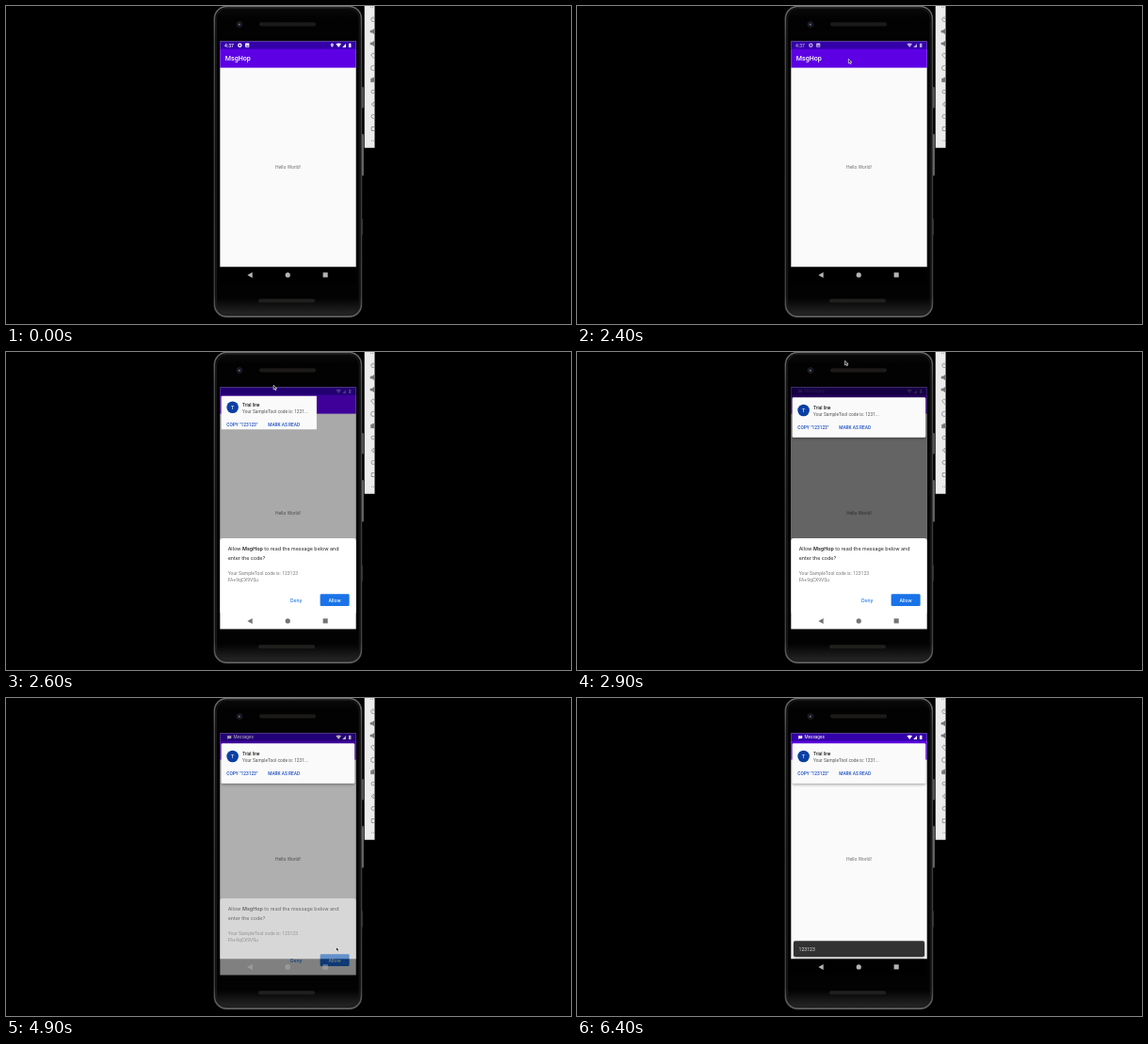
Recreate the animation shown at these times as an HTML page. Size 600 px wide and 338 px high, loop 7300 ms.

```html
<!DOCTYPE html>
<html lang="en">
<head>
<meta charset="utf-8">
<title>Message code prompt</title>
<style>
html, body { margin: 0; width: 100%; height: 100%; overflow: hidden; background: #000; }
svg { display: block; width: 100vw; height: 100vh; }
text { font-family: Roboto, "Noto Sans", sans-serif; font-size: 4.8px; white-space: pre; }
.medium { font-weight: 500; }
.prompt { font-family: Inter, Roboto, sans-serif; font-size: 5.2px; fill: #202124; }
</style>
</head>
<body>
<svg viewBox="0 0 600 338" xmlns="http://www.w3.org/2000/svg">
  <defs>
    <linearGradient id="rim" x1="0" x2="0" y1="0" y2="1">
      <stop offset="0" stop-color="#6a6a6a"/><stop offset=".1" stop-color="#4a4a4a"/>
      <stop offset=".5" stop-color="#3a3a3a"/><stop offset=".93" stop-color="#404040"/>
      <stop offset="1" stop-color="#686868"/>
    </linearGradient>
    <linearGradient id="body" x1="0" x2="0" y1="0" y2="1">
      <stop offset="0" stop-color="#0a0a0a"/><stop offset=".04" stop-color="#020202"/>
      <stop offset=".94" stop-color="#020202"/><stop offset="1" stop-color="#2a2a2a"/>
    </linearGradient>
    <filter id="shadow" x="-10%" y="-20%" width="120%" height="150%">
      <feDropShadow dx="0" dy="1.2" stdDeviation="1.4" flood-color="#000" flood-opacity=".38"/>
    </filter>
    <clipPath id="screen"><rect x="227.3" y="37.6" width="144.4" height="257"/></clipPath>
    <clipPath id="strip"><rect x="380.7" width="10.8" height="150.7"/></clipPath>
    <clipPath id="reveal"><rect id="revealBox"/></clipPath>
    <g id="navIcons">
      <path d="M261.7 283v6l-5.4-3z"/>
      <circle cx="299.2" cy="285.9" r="2.6"/>
      <rect x="336.6" y="283.3" width="5.1" height="5.1"/>
    </g>
  </defs>

  <rect width="600" height="338"/>

  <!-- Phone body -->
  <rect x="377.8" y="86" width="2" height="22.5" rx="1" fill="#5c5c5c"/>
  <rect x="377.8" y="136" width="2" height="44.5" rx="1" fill="#727272"/>
  <rect x="377.6" y="226.5" width="1.3" height="17" fill="#303030"/>
  <rect x="221.4" y=".5" width="156" height="329.8" rx="13" fill="url(#body)" stroke="url(#rim)" stroke-width="1.6"/>
  <rect x="223.6" y="2.6" width="151.6" height="325.4" rx="11" fill="none" stroke="#1c1c1c" stroke-width=".9"/>
  <rect x="269" y="17.2" width="60" height="4.2" rx="2" fill="#1c1a19"/>
  <rect x="268" y="311.2" width="60" height="4" rx="2" fill="#201f1e"/>
  <circle cx="247.9" cy="19.5" r="2.8" fill="#0b0d14" stroke="#2c2c2c" stroke-width=".8"/>
  <circle cx="247.8" cy="19.6" r="1.2" fill="#53668f"/>

  <!-- Emulator strip -->
  <g clip-path="url(#strip)">
    <rect x="380" width="12" height="151" fill="#ececec"/>
    <g id="tools" fill="none" stroke="#777" stroke-width=".7"/>
  </g>

  <g clip-path="url(#screen)">
    <rect x="227" y="37" width="145" height="240.5" fill="#fafafa"/>
    <rect x="227" y="45" width="145" height="20.6" fill="#5d00e4"/>
    <rect x="227" y="37" width="145" height="8.7" fill="#3400a9"/>
    <text class="medium" x="232.8" y="58.3" fill="#fff" style="font-size:7.1px">MsgHop</text>
    <text x="299.4" y="173.4" fill="#757575" text-anchor="middle" style="font-size:5px">Hello World!</text>
    <g fill="#fff">
      <g id="clock">
        <text class="medium" x="232" y="43.6" style="font-size:5px">4:37</text>
        <circle cx="248.3" cy="41.7" r="1.6" fill="none" stroke="#fff" stroke-width="1.3"/>
        <rect x="254.1" y="39.6" width="4.2" height="4.2" rx=".5"/>
        <path d="M255 43l1-1.3.7.8.5-.6.6 1.1z" fill="#3400a9"/>
      </g>
      <g id="sender">
        <path d="M235.2 39.9h4v3.2h-3l-1 .9z"/>
        <path d="M236.3 41h2" stroke="#3400a9" stroke-width=".5"/>
        <text x="241.4" y="43.4" style="font-size:4.7px">Messages</text>
      </g>
      <path id="pin" d="M346.3 39.4a1.7 1.7 0 0 1 1.6 1.8q0 1-1.6 2.9q-1.6-1.9-1.6-2.9a1.7 1.7 0 0 1 1.6-1.8z"/>
      <g id="signals">
        <path d="M350.4 40.3q2.8-1.8 5.6 0L353.2 43.9z"/>
        <path d="M357.2 43.9h3.8v-4z"/>
        <path d="M363.9 39.9h.7v-.5h1.1v.5h.7v4.1h-2.5z"/>
      </g>
    </g>
    <rect x="227" y="277.5" width="145" height="18"/>
    <use href="#navIcons" fill="#b4b4b4"/>
    <rect id="scrim" x="227" y="37" width="145" height="258"/>

    <g id="banner" clip-path="url(#reveal)">
      <rect x="228.6" y="48.3" width="141.6" height="42.4" rx="1.2" fill="#fafafa" filter="url(#shadow)"/>
      <g id="bannerContent">
        <circle cx="240.6" cy="62" r="6.3" fill="#0b3fa3"/>
        <text x="240.6" y="64.2" fill="#fff" text-anchor="middle" style="font-size:6.2px">T</text>
        <text class="medium" x="251" y="61.1" fill="#222">Trial line</text>
        <text x="251" y="68.1" fill="#555">Your SampleTool code is: 1231...</text>
        <g fill="#1d4fc0">
          <text class="medium" x="234.3" y="81.9">COPY "123123"</text>
          <text class="medium" x="278.2" y="81.9">MARK AS READ</text>
        </g>
      </g>
    </g>

    <g id="snack">
      <rect x="230" y="258.3" width="139" height="16.6" rx="1.6" fill="#323232" filter="url(#shadow)"/>
      <text x="235.6" y="268.5" fill="#e4e4e4" style="font-size:5.1px">123123</text>
    </g>

    <g id="dialog">
      <path d="M227 400V201.2q0-3.2 3.2-3.2h138.6q3.2 0 3.2 3.2V400z" fill="#fff"/>
      <text class="prompt" x="235.7" y="211.4" style="font-size:5.35px">Allow <tspan font-weight="600">MsgHop</tspan> to read the message below and</text>
      <text class="prompt" x="235.7" y="221.2" style="font-size:5.35px">enter the code?</text>
      <g fill="#7b7b7b">
        <text x="235.7" y="237" style="font-size:5px">Your SampleTool code is: 123123</text>
        <text x="235.7" y="244.4" style="font-size:5px">FA+9qCX9VSu</text>
      </g>
      <rect x="333.6" y="257.3" width="31" height="12.8" rx="1.4" fill="#1a73e8"/>
      <text class="prompt" x="349.1" y="265.5" text-anchor="middle" style="fill:#fff;font-size:5px;font-weight:500">Allow</text>
      <text class="prompt" x="308.2" y="265.5" text-anchor="middle" style="fill:#1a73e8;font-size:5px;font-weight:500">Deny</text>
    </g>
    <use id="lightNav" href="#navIcons" fill="#757575"/>
  </g>

  <path id="cursor" d="M0 0v4.6l1.1-1 .8 1.7.9-.4-.8-1.6h1.5z" fill="#111" stroke="#fff" stroke-width=".65"/>
</svg>

<script>
const LOOP = 7300, STEP = 100;
const $ = id => document.getElementById(id);
const clamp = v => Math.min(1, Math.max(0, v));
const mix = (a, b, p) => a + (b - a) * p;
const span = (t, start, length) => clamp((t - start) / length);
const show = (id, opacity) => $(id).setAttribute('opacity', opacity);
const move = (id, transform) => $(id).setAttribute('transform', transform);

// Toolbar glyphs, cut off by the right edge of the strip
const glyphs = [
  'M-3 0h1m1 0h1', 'M-1-2a2.3 2.3 0 1 0 2 0M0-3v3', 'M-3-1h1.5L1-2.5v5L-1.5 1H-3z',
  'M-3-1h1.5L1-2.5v5L-1.5 1H-3z', 'M-2.5-1L0-3 3 1 1 3z', 'M-2.5 0A2.6 2.6 0 1 1 0 2.6L-2 2z',
  'M-2.5-1.5h1l1-1H2v4.5h-4.5zM-1 0h2', 'M-2-.5a1.8 1.8 0 1 0 3.6 0a1.8 1.8 0 1 0-3.6 0',
  'M1-2.5L-2 0 1 2.5z', 'M-2 0a2 2 0 1 0 4 0a2 2 0 1 0-4 0', 'M-1.8-1.8h4v4h-4z', 'M-2 0h1m1 0h1'
];
const solidGlyphs = [2, 3, 6];
$('tools').innerHTML = glyphs.map((d, i) =>
  `<path d="${d}" transform="translate(390 ${1.3 + i * 12.9})"${solidGlyphs.includes(i) ? ' fill="#777"' : ''}/>`).join('');

// Each path holds [time, x, y]; the pointer is hidden between paths
const pointerPaths = [
  [[1700, 378, 136], [1900, 310, 118], [2500, 284, 44], [2900, 284.6, 9.4], [3400, 284.6, 9.4], [3800, 340, 131]],
  [[4100, 376.3, 255.2], [4800, 350.5, 264.6], [5400, 350.5, 264.6], [5700, 308, 248],
   [6100, 232, 262], [6200, 266, 269], [6400, 281, 272]]
];

function pointerAt(t) {
  const path = pointerPaths.find(p => t >= p[0][0] && t < p[p.length - 1][0]);
  if (!path) return null;
  const i = path.findIndex(k => k[0] > t);
  const [t0, x0, y0] = path[i - 1], [t1, x1, y1] = path[i];
  const p = (t - t0) / (t1 - t0);
  return [mix(x0, x1, p), mix(y0, y1, p)];
}

function draw(t) {
  const opening = span(t, 2400, 200);
  const closing = span(t, 4840, 120);
  const visible = opening * (1 - closing);
  show('dialog', visible);
  move('dialog', `translate(0 ${94 * (1 - opening) + 30 * closing})`);
  show('lightNav', visible);
  show('scrim', 0.6 * span(t, 2465, 250) * (1 - closing));

  const drop = 1 - (1 - span(t, 2500, 250)) ** 2;
  show('banner', t < 2500 ? 0 : 1);
  const box = { x: mix(234, 222, drop), y: mix(44, 42, drop), width: mix(10.4, 156, drop), height: mix(11, 58, drop) };
  for (const name in box) $('revealBox').setAttribute(name, box[name]);
  move('banner', `translate(0 ${mix(-4, 0, drop)})`);
  move('bannerContent', `translate(0 ${mix(-5, 0, drop)})`);

  show('pin', t < 1000 ? 0.75 : 0);
  show('clock', 1 - span(t, 2350, 150));
  show('sender', t >= 4900 ? 1 : 0.25 * span(t, 2600, 200));
  show('signals', t >= 4900 ? 1 : mix(1, 0.3, span(t, 2300, 200)));

  const pop = span(t, 4915, 150);
  const scale = mix(0.8, 1, 1 - (1 - pop) ** 2);
  show('snack', pop);
  move('snack', `translate(299.5 266.6) scale(${scale}) translate(-299.5 -266.6)`);

  const pointer = pointerAt(t);
  show('cursor', pointer ? 1 : 0);
  if (pointer) move('cursor', `translate(${pointer})`);
}

const begin = performance.now();
function tick() {
  const t = (performance.now() - begin) % LOOP;
  draw(Math.floor(t / STEP) * STEP);
  requestAnimationFrame(tick);
}
tick();
</script>
</body>
</html>
```
